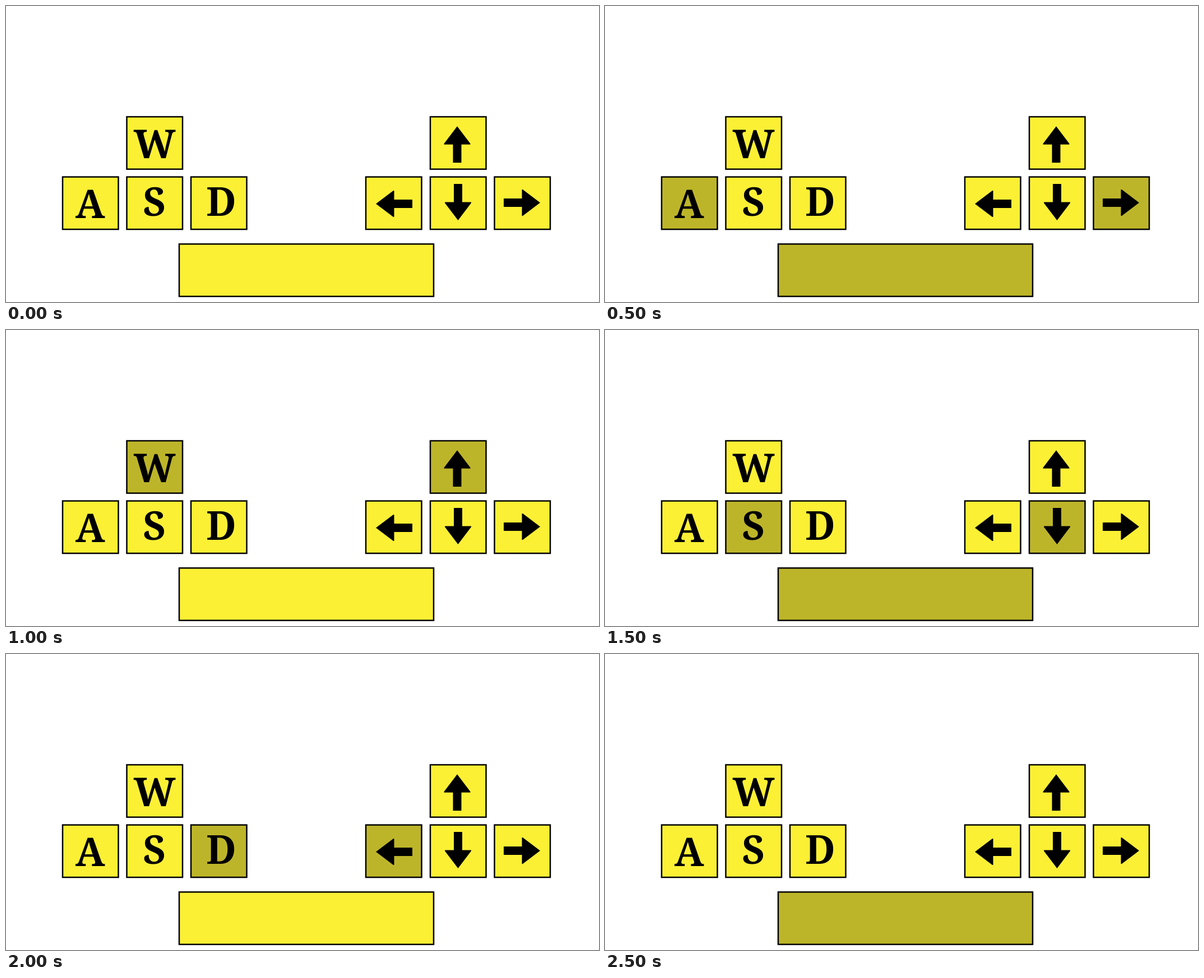
Animation, 1058 px wide and 529 px high, one loop 3 s. Source, as an HTML page:

```html
<!DOCTYPE html>
<html lang="en">
<head>
<meta charset="utf-8">
<title>Keyboard controls</title>
<style>
  html, body { margin: 0; height: 100%; overflow: hidden; background: #fff; }
  svg { display: block; width: 100%; height: 100%; }
  rect { stroke: #000; stroke-width: 2.5; }
  text { font: 600 70px "Noto Serif", serif; text-anchor: middle; }
</style>
</head>
<body>
<svg viewBox="0 0 1058 529"></svg>
<script>
const svg = document.querySelector("svg");
const UP = "#fcf035", DOWN = "#bdb529";
const STEP = 500, STEPS = 6;
const keys = [];

function add(tag, attrs, text = "") {
  const el = document.createElementNS("http://www.w3.org/2000/svg", tag);
  for (const name in attrs) el.setAttribute(name, attrs[name]);
  el.textContent = text;
  return svg.appendChild(el);
}

// pressed: the steps in which the key is held
function key(x, y, pressed, width = 99.5) {
  const el = add("rect", { x, y, width, height: 93.6 });
  keys.push({ el, pressed });
}

function letter(char, x, y) {
  add("text", { x, y }, char);
}

// x, y: tip of the arrow; angle 0 points up
function arrow(x, y, angle) {
  add("path", {
    d: "M0 0L23.5 31V32.5H7.5V65H-7.5V32.5H-23.5V31Z",
    transform: `translate(${x} ${y}) rotate(${angle})`
  });
}

key(215.5, 198, [2]);
key(101, 305.5, [1]);
key(215.5, 305.5, [3]);
key(330, 305.5, [4]);
letter("W", 265, 272);
letter("A", 150, 378.5);
letter("S", 265, 374.5);
letter("D", 384, 374.5);

key(757, 198, [2]);
key(642, 305.5, [4]);
key(757, 305.5, [3]);
key(871.5, 305.5, [1]);
arrow(805, 215, 0);
arrow(660, 353.5, -90);
arrow(806.5, 383, 180);
arrow(953, 351.5, 90);

key(309, 425.4, [1, 3, 5], 454);

function draw() {
  const step = Math.floor(performance.now() / STEP) % STEPS;
  for (const { el, pressed } of keys)
    el.setAttribute("fill", pressed.includes(step) ? DOWN : UP);
  requestAnimationFrame(draw);
}
draw();
</script>
</body>
</html>
```
